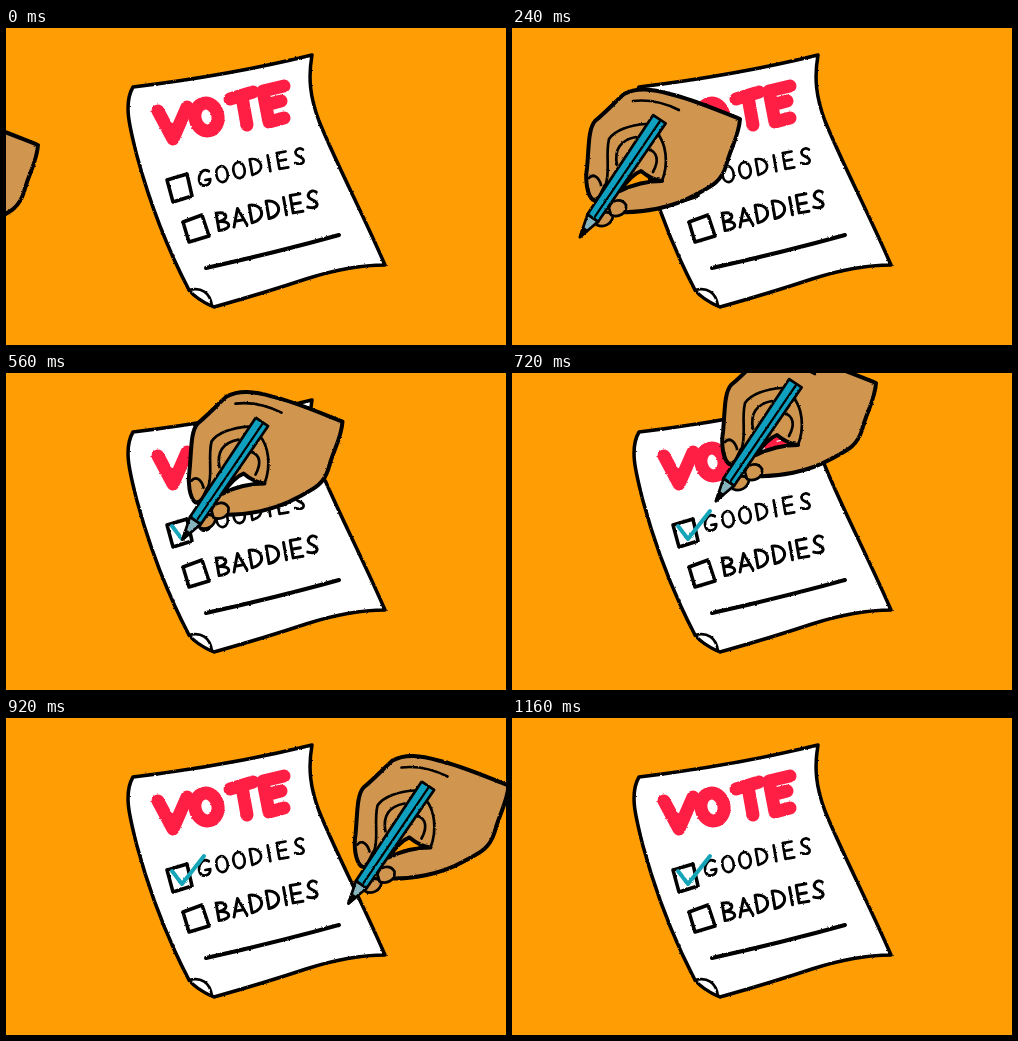
These frames come from a looping animation (500x317 px, 1200 ms). An HTML page:

```html
<!DOCTYPE html>
<html lang="en">
<meta charset="utf-8">
<title>Vote</title>
<style>
html, body { margin: 0; height: 100%; overflow: hidden; background: #ff9d05; }
svg { display: block; width: 100%; height: 100%; fill: none; stroke: #000; stroke-width: 3.5; stroke-linecap: round; stroke-linejoin: round; }
.skin { fill: #d09650; }
.paper { fill: #fff; }
.thin { stroke-width: 2.7; }
</style>
<svg viewBox="0 0 500 317" role="img" aria-label="VOTE: GOODIES, BADDIES">
  <defs>
    <filter id="rough" filterUnits="userSpaceOnUse" x="0" y="0" width="500" height="317" color-interpolation-filters="sRGB">
      <feTurbulence type="fractalNoise" baseFrequency=".35" numOctaves="2" seed="4"/>
      <feDisplacementMap in="SourceGraphic" scale="2" xChannelSelector="R" yChannelSelector="G"/>
    </filter>
    <clipPath id="inked"><rect id="ink" height="317"/></clipPath>
  </defs>

  <g filter="url(#rough)">
    <path class="paper" d="M127 59C185 52 245 42 306 27C302 50 304 69 313 93C330 135 357 186 379 237C350 237 325 243 300 251C270 261 240 270 208 279C197 274 189 269 183 262C160 218 143 172 131 128C124 100 117 76 127 59Z"/>
    <path class="paper thin" d="M183 262C195 259 204 264 206 278C197 274 189 269 183 262Z"/>
    <g stroke="#ff1f45" stroke-width="13">
      <path d="M152 83L167 111L181 79"/>
      <ellipse cx="200.5" cy="89" rx="11.5" ry="14" transform="rotate(-12 200.5 89)"/>
      <path d="M224 71L247 64M236 69L241 97"/>
      <path d="M278 58L257 63L263 94L278 90M260 77L275 73"/>
    </g>
    <path d="M161 152L181 146L186 168L167 174ZM177 194L196 187L203 208L183 214Z"/>
    <path stroke-width="4" d="M200 240C245 230 290 219 333 207"/>
    <g id="words" class="thin"></g>
    <path clip-path="url(#inked)" stroke="#16a5b8" stroke-width="4" d="M166 153L176 166L198 138"/>
  </g>

  <g id="hand" filter="url(#rough)">
    <path class="skin" stroke-width="4" fill-rule="evenodd" d="M228 91C205 82 180 71 158 66C140 61 125 59 112 66C103 74 94 84 83 93C76 101 77 120 75 140C73 152 75 167 81 172C88 172 90 164 93 158L100 166C96 174 99 183 107 184C130 185 160 180 183 167C200 158 209 154 214 138C218 121 227 108 228 91Z"/>
    <path class="skin" stroke="none" d="M93 158L100 166L112 150Z"/>
    <g class="thin">
      <path d="M121 73C138 71 153 75 167 82"/>
      <path d="M77 150C81 145 87 149 89 157M93 158C99 146 93 128 97 111C103 102 118 97 134 96"/>
      <path d="M105 137C102 122 108 112 124 109M145 105C154 115 157 135 150 153"/>
      <path d="M136 121C146 124 147 133 141 144"/>
      <path class="skin" d="M85 189C89 184 98 182 101 188C100 196 92 200 85 197Z"/>
      <path class="skin" d="M97 180C99 171 110 170 114 177C115 186 106 190 99 187Z"/>
    </g>
    <g class="thin" transform="translate(68 209) rotate(-56)">
      <path fill="#86b4bc" d="M0 0L23 -6.5V6.5Z"/>
      <path fill="#000" d="M0 0L9 -2.5V2.5Z"/>
      <path fill="#0fa0bf" d="M23 -6.5L142 -7.5V7.5L23 6.5Z"/>
      <path stroke-width="2.2" d="M24 1L141 1.5"/>
    </g>
  </g>
</svg>
<script>
const $ = id => document.getElementById(id);

// Pen-drawn capitals, centred on the origin
const glyphs = {
  G: 'M5 -6C-1 -11 -7 -3 -6 3C-5 9 4 9 5 2L0 2',
  O: 'M0 -8C-8 -7 -7 8 0 8C8 7 7 -8 0 -8Z',
  D: 'M-5 -8V8C9 7 8 -8 -5 -8',
  I: 'M0 -8V8',
  E: 'M5 -8H-4V8H5M-4 0H4',
  S: 'M5 -6C1 -11 -7 -4 0 0S4 10 -5 6',
  B: 'M-5 -8V8C8 9 7 0 -4 0C6 0 6 -9 -5 -8',
  A: 'M-6 8L0 -8L6 8M-4 3H4'
};
const write = (word, y, slope, size, xs) => [...word].map((c, i) =>
  `<path d="${glyphs[c]}" transform="translate(${xs[i]} ${y + (xs[i] - xs[0]) * slope}) rotate(-10) scale(${size})"/>`).join('');
$('words').innerHTML =
  write('GOODIES', 150, -.23, 1, [199, 216, 233, 250, 263, 276, 293]) +
  write('BADDIES', 193, -.24, 1.1, [217, 233, 250, 267, 279, 290, 306]);

// Hand path: time, x, y
const keys = [
  [-100, -290, 38], [0, -196, 26], [240, 0, 0], [400, 100, -54], [580, 110, -42],
  [720, 136, -81], [840, 207, -48], [1000, 342, 0], [1120, 413, 28], [1200, 470, 46]
];
const slope = (i, k) => (keys[i + 1][k] - keys[i][k]) / (keys[i + 1][0] - keys[i][0]);
function tangent(i, k) {
  if (i === keys.length - 1) return slope(i - 1, k);
  const a = slope(i - 1, k), b = slope(i, k);
  return a * b > 0 ? 2 * a * b / (a + b) : 0;
}
function at(t, k) {
  let i = 1;
  while (t >= keys[i + 1][0]) i++;
  const d = keys[i + 1][0] - keys[i][0], u = (t - keys[i][0]) / d, v = 1 - u;
  return keys[i][k] * v * v * (1 + 2 * u) + keys[i + 1][k] * u * u * (3 - 2 * u)
    + d * u * v * (tangent(i, k) * v - tangent(i + 1, k) * u);
}

// Opening between the fingers and the thumb, with its own outline
const hole = 'M108 163C115 153 121 146 129 143C135 148 142 152 150 153C136 153 122 156 108 163Z';
const palm = $('hand').firstElementChild;
palm.setAttribute('d', palm.getAttribute('d') + hole);

function draw(now) {
  const t = Math.floor(now % 1200 / 40) * 40;
  const x = at(t, 1), y = at(t, 2);
  $('hand').setAttribute('transform', `translate(${x} ${y})`);
  $('ink').setAttribute('width', Math.max(0, 67 + x)); // the tick follows the pen tip
  requestAnimationFrame(draw);
}
draw(0);
</script>
</html>
```
